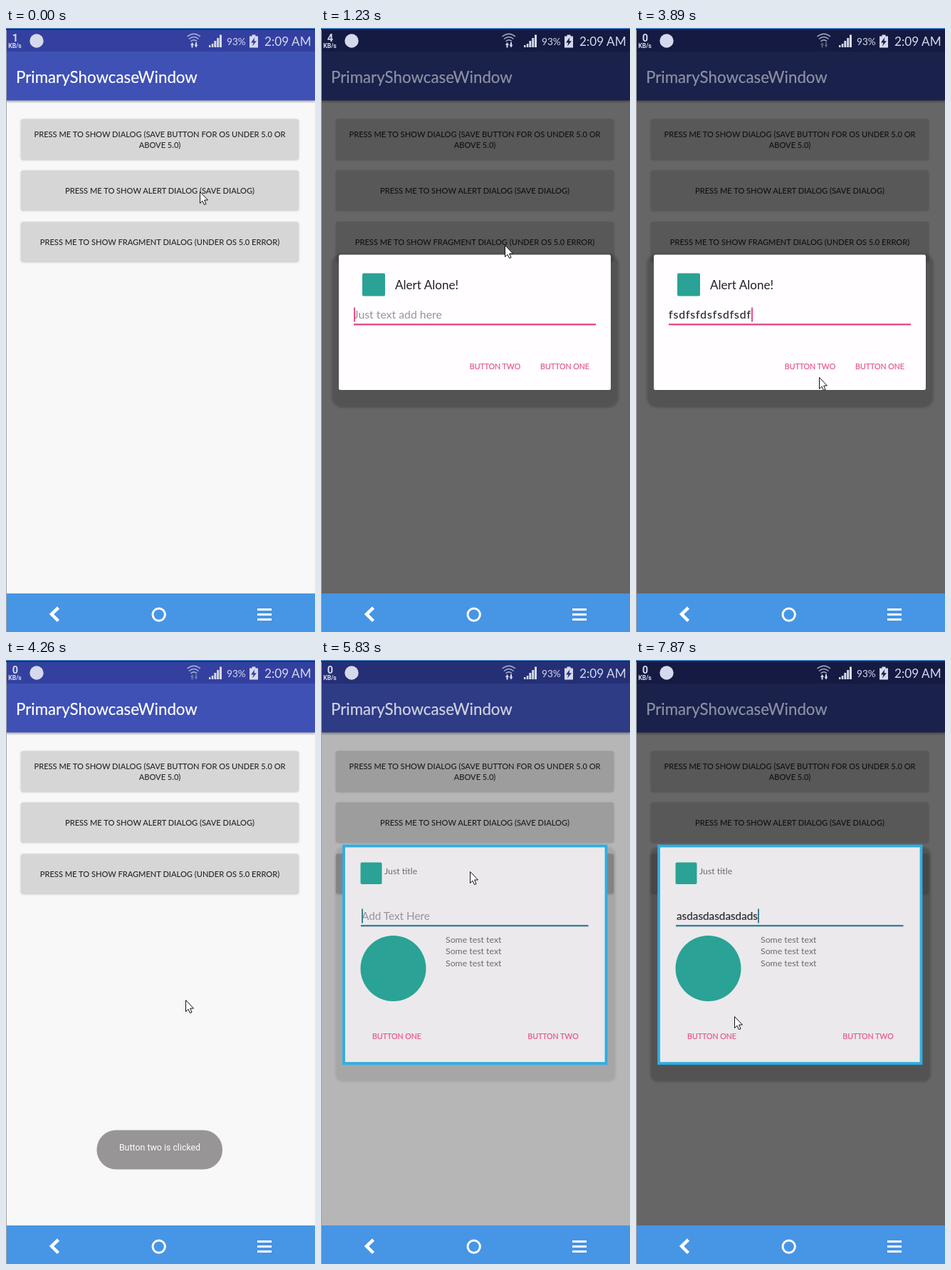
An HTML page for the animation above (7.99 s loop, 434 by 846 pixels).

```html
<!DOCTYPE html>
<html lang="en">
<head>
<meta charset="utf-8">
<title>Dialog demo</title>
<style>
  html, body { margin: 0; width: 100%; height: 100%; overflow: hidden; background: #f8f8f8; }
  svg { display: block; width: 100vw; height: 100vh; font-family: Lato, "Open Sans", sans-serif; }
  .btn { fill: #d6d6d6; }
  .cap { font-size: 11.1px; font-weight: 500; text-anchor: middle; fill: #262626; }
  .act { font-size: 10.6px; fill: #e5578c; stroke: #e5578c; stroke-width: .2; text-anchor: middle; }
  .small { font-size: 12.3px; fill: #6c6a6d; }
  .hint { fill: #969497; }
  .typed { fill: #2c2c2e; stroke: #2c2c2e; stroke-width: .2; }
  .one { font-size: 15.8px; }
  .one.typed { letter-spacing: .9px; }
  .two { font-size: 15.3px; }
  .logo { fill: #2aa295; }
  .tiny { font: bold 8.6px Roboto, sans-serif; text-anchor: middle; }
</style>
</head>
<body>
<svg viewBox="0 0 434 846" preserveAspectRatio="none">
  <defs>
    <filter id="soft" x="-10%" y="-10%" width="120%" height="120%"><feGaussianBlur stdDeviation="1.4"/></filter>
  </defs>

  <rect width="434" height="846" fill="#f8f8f8"/>
  <rect y="99" width="434" height="5" fill="#000" opacity=".25" filter="url(#soft)"/>
  <rect y="33" width="434" height="68.500" fill="#3f51b5"/>
  <rect y="2" width="434" height="31" fill="#3340a0"/>
  <g id="buttons"></g>
  <rect id="dim" y="2" width="434" height="790"/>

  <text id="title" x="14" y="77" font-size="22.3" fill="#fff" stroke="#fff" stroke-width=".2">PrimaryShowcaseWindow</text>

  <g fill="#d6d9ec">
    <text id="rate" class="tiny" x="13" y="19" style="font-size:14.5px">1</text>
    <text class="tiny" x="12.5" y="27.5">KB/s</text>
    <circle cx="43" cy="18" r="9.7"/>
    <g fill="none" stroke="#d6d9ec" stroke-width="1.4" opacity=".75">
      <path d="M254.5 12 Q264 4.500 273 12"/>
      <path d="M257 15.500 Q264 9.500 270.500 15.500"/>
      <path d="M259.500 18.700 Q264 14.800 268 18.700"/>
    </g>
    <path id="traffic" d="M259 24 L261.500 20 L264 24 H262.500 V27.500 H260.500 V24Z M264.500 23.500 H266 V20 H268 V23.500 H269.500 L267 27.500Z"/>
    <path d="M285 24h2.500v3h-2.500z M288.800 22h2.500v5h-2.500z M292.300 18h3v9h-3z M296.200 14h3v13h-3z M300 9.500h3v17.500h-3z"/>
    <text x="310" y="24" font-size="13.6">93%</text>
    <path fill-rule="evenodd" d="M345.500 9.500h5v2h3.500v16h-12v-16h3.500z M349.500 13 L344 20.500 H347.500 L346 25.500 L352 18.300 H348.500Z"/>
    <text x="363" y="24.500" font-size="17.2">2:09 AM</text>
  </g>

  <g id="alert">
    <rect class="shade" x="15" y="316" width="403" height="216" rx="15" filter="url(#soft)"/>
    <rect x="25" y="317.500" width="382" height="189.500" rx="2.500" fill="#fffdff"/>
    <rect class="logo" x="58" y="343.500" width="32" height="32" rx="2"/>
    <text x="104" y="366" font-size="17.1" fill="#222">Alert Alone!</text>
    <text class="one hint" x="46" y="407">Just text add here</text>
    <text class="one typed" x="46" y="407"></text>
    <rect class="caret" y="391.500" width="2" height="20" fill="#e94d86"/>
    <rect x="46" y="414" width="340" height="2.400" fill="#e94d86"/>
    <text class="act" x="244.500" y="477.500">BUTTON TWO</text>
    <text class="act" x="342.500" y="477.500">BUTTON ONE</text>
  </g>

  <g id="custom">
    <rect class="shade" x="20" y="262" width="394" height="329" rx="10" filter="url(#soft)"/>
    <rect x="32" y="260.500" width="368.500" height="304.500" fill="#ebe9ec" stroke="#2eaee3" stroke-width="3.800"/>
    <rect class="logo" x="55.500" y="283.500" width="30" height="30.500" rx="2"/>
    <text class="small" x="89" y="299.500">Just title</text>
    <text class="two hint" x="57" y="364">Add Text Here</text>
    <text class="two typed" x="57" y="364"></text>
    <rect class="caret" y="348.500" width="2" height="20" fill="#3d7f96"/>
    <rect x="56" y="371" width="319.500" height="2.400" fill="#3d7f96"/>
    <circle class="logo" cx="101.500" cy="432" r="46"/>
    <g class="small">
      <text x="175" y="395.500">Some test text</text>
      <text x="175" y="412">Some test text</text>
      <text x="175" y="428.500">Some test text</text>
    </g>
    <text class="act" x="106.500" y="530.500">BUTTON ONE</text>
    <text class="act" x="326" y="530.500">BUTTON TWO</text>
  </g>

  <g id="toast">
    <rect x="127.500" y="658.500" width="176.500" height="55" rx="27" fill="#5a5558"/>
    <text x="216" y="687" text-anchor="middle" style="font:12.4px Roboto,sans-serif" fill="#fff">Button two is clicked</text>
  </g>

  <rect y="792" width="434" height="54" fill="#4795e5"/>
  <rect width="1" height="846" fill="#a3a3a6"/>
  <rect width="434" height="1" fill="#4795e5"/>
  <rect y="1" width="434" height="1.500" fill="#20284f"/>
  <path d="M73.500 812 L64 821 L73.500 830.500" fill="none" stroke="#fff" stroke-width="4.500"/>
  <circle cx="214.700" cy="821.600" r="8.700" fill="none" stroke="#fff" stroke-width="3"/>
  <path d="M353 814.500h20 M353 821.500h20 M353 828.500h20" stroke="#fff" stroke-width="3.200"/>

  <path id="pointer" d="M.5 .5 V16.500 L4 13.200 L6.500 18.500 L9 17.500 L6.700 12 H11.500Z" fill="#fff" stroke="#111"/>
</svg>

<script>
const LOOP = 7990;
const $ = id => document.getElementById(id);

// Bursts of screen updates: start, end, number of updates
const BURSTS = [
  [220, 690, 5], [880, 1230, 4], [1600, 2320, 7], [2450, 3170, 7],
  [3290, 3410, 2], [3650, 3890, 3], [4130, 4610, 5], [4860, 5590, 7],
  [5710, 6430, 7], [6550, 7270, 7], [7390, 7870, 5]
];
const ALERT_OPEN = 220, ALERT_CLOSE = 4130, CUSTOM_OPEN = 5710;

// Tracks: time followed by values, linear in between
const POINTER = [
  [0, 272, 229], [690, 272, 229], [1230, 258, 304], [2320, 258, 304],
  [3170, 258, 484], [3410, 257, 489], [3890, 257, 489], [4250, 252, 476],
  [4860, 251, 470], [5590, 209, 296], [5830, 209, 296], [6430, 219, 340],
  [6790, 220, 354], [7270, 205, 400], [7870, 138, 499]
];
const TYPING_ONE = [[1600, 0], [2320, 7], [3170, 12], [3530, 12], [3890, 15]];
const TYPING_TWO = [[6430, 0], [6790, 3], [7750, 15]];
const TOAST = [[4129, 0], [4130, .25], [4250, .6], [4370, .9], [4860, .9], [5340, 0]];
const DIM_IN = [[-1, 0], [0, .12], [120, .45], [240, .8], [360, 1]];
const SHOW = [[-1, 0], [0, .45], [120, 1]];

function snap(t) {
  const burst = BURSTS.filter(b => b[0] <= t).pop();
  if (!burst) return 0;
  const [start, end, count] = burst;
  const step = (end - start) / (count - 1);
  return start + step * Math.min(count - 1, Math.floor((t - start) / step + 1e-6));
}

function at(track, t, i = 1) {
  const next = track.findIndex(k => k[0] > t);
  if (next < 0) return track[track.length - 1][i];
  if (next === 0) return track[0][i];
  const a = track[next - 1], b = track[next];
  return a[i] + (b[i] - a[i]) * (t - a[0]) / (b[0] - a[0]);
}

const within = (t, a, b) => t >= a && t < b;

function addButton(y, h, lines) {
  const caps = lines.map(([text, base]) => `<text class="cap" x="216" y="${base}">${text}</text>`).join("");
  $("buttons").insertAdjacentHTML("beforeend",
    `<rect x="21" y="${y + 1}" width="390" height="${h}" rx="3" opacity=".22" filter="url(#soft)"/>
     <rect class="btn" x="21" y="${y}" width="390" height="${h}" rx="2.5"/>${caps}`);
}
addButton(127.5, 56.5, [["PRESS ME TO SHOW DIALOG (SAVE BUTTON FOR OS UNDER 5.0 OR", 153], ["ABOVE 5.0)", 167.5]]);
addButton(199.5, 55.5, [["PRESS ME TO SHOW ALERT DIALOG (SAVE DIALOG)", 232]]);
addButton(271.5, 55.5, [["PRESS ME TO SHOW FRAGMENT DIALOG (UNDER OS 5.0 ERROR)", 303.5]]);
const buttons = document.querySelectorAll(".btn");
const shades = document.querySelectorAll(".shade");

function setField(dialog, text, caretOn) {
  const typed = dialog.querySelector(".typed");
  const caret = dialog.querySelector(".caret");
  typed.textContent = text;
  dialog.querySelector(".hint").style.display = text ? "none" : "";
  const width = text ? typed.getComputedTextLength() : 0;
  caret.setAttribute("x", +typed.getAttribute("x") + width);
  caret.setAttribute("opacity", caretOn ? 1 : 0);
}

function fade(el, opacity) {
  el.setAttribute("opacity", opacity);
  el.style.visibility = opacity > 0 ? "visible" : "hidden";
}

function draw(time) {
  const t = snap(time);
  const closing = t >= ALERT_CLOSE;
  const left = t === ALERT_CLOSE ? .35 : 0;
  const alertDim = closing ? left : at(DIM_IN, t - ALERT_OPEN);
  const dim = Math.max(alertDim, at(DIM_IN, t - CUSTOM_OPEN));

  $("dim").setAttribute("opacity", .59 * dim);
  $("title").setAttribute("opacity", 1 - .5 * dim);
  shades.forEach(s => s.setAttribute("opacity", .18 * dim));
  fade($("alert"), closing ? left : at(SHOW, t - ALERT_OPEN));
  fade($("custom"), at(SHOW, t - CUSTOM_OPEN));
  fade($("toast"), at(TOAST, t));

  buttons[1].style.fill = within(t, 220, 400) ? "#c4c4c6" : "";
  buttons[2].style.fill = within(t, 5470, 5900) ? "#c4c4c6" : "";

  const first = Math.floor(at(TYPING_ONE, t) + .01);
  const second = Math.floor(at(TYPING_TWO, t) + .01);
  setField($("alert"), "fsdfsfdsfsdfsdf".slice(0, first), !within(t, 880, 1200) && !within(t, 3290, 3400));
  setField($("custom"), "asdasdasdasdads".slice(0, second), true);

  $("rate").textContent = t < 990 ? 1 : t < 1950 ? 4 : 0;
  $("traffic").setAttribute("opacity", within(t, 2560, 5000) ? .35 : 1);
  $("pointer").setAttribute("transform", `translate(${Math.round(at(POINTER, t, 1))} ${Math.round(at(POINTER, t, 2))})`);
}

const begin = performance.now();
function tick() {
  draw((performance.now() - begin) % LOOP);
  requestAnimationFrame(tick);
}
tick();
</script>
</body>
</html>
```
